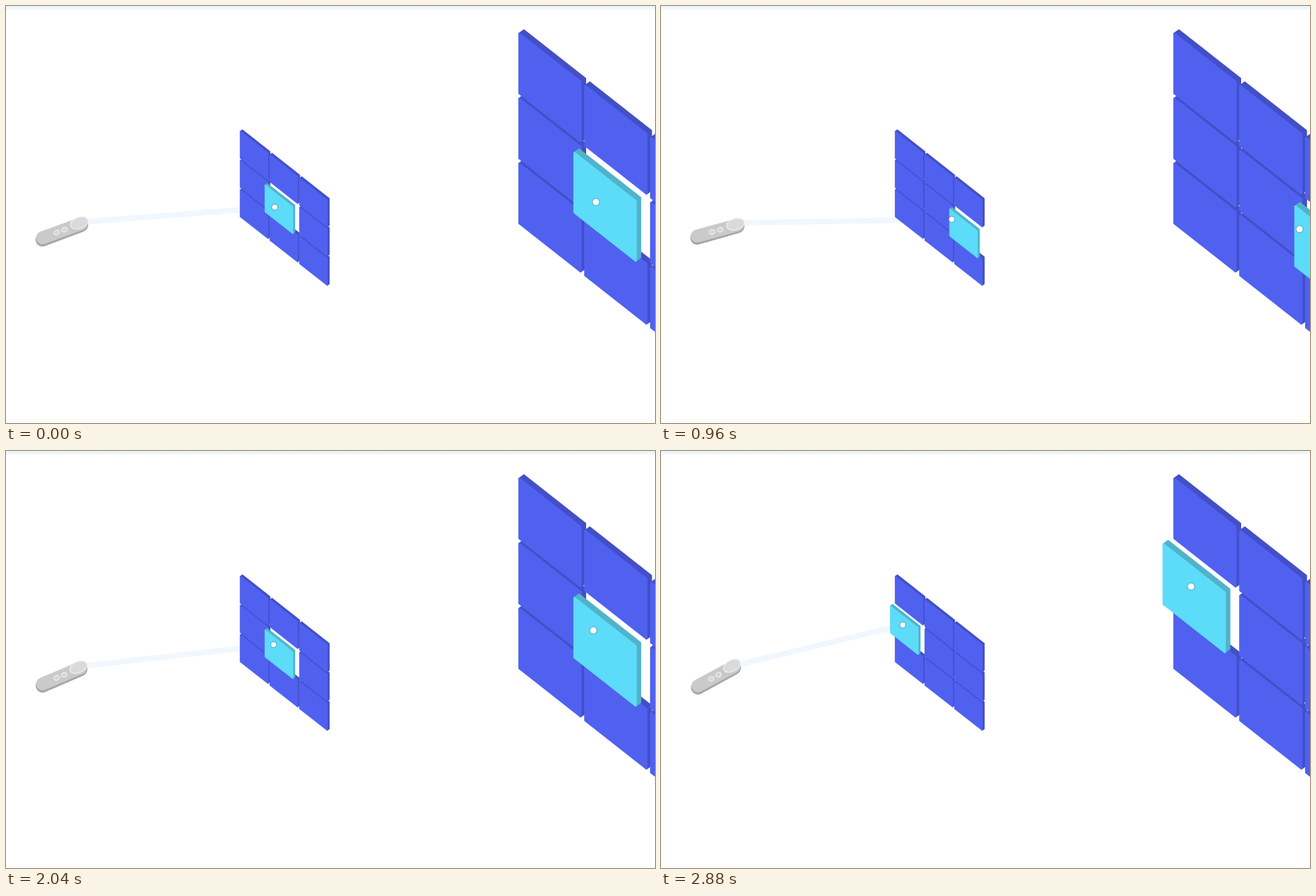
These frames come from a looping animation (933 px wide and 600 px high, 2940 ms). An HTML page with a canvas:

```html
<!DOCTYPE html>
<html lang="en">
<head>
<meta charset="utf-8">
<title>Pointing at tiles</title>
<style>
html, body { margin: 0; width: 100%; height: 100%; overflow: hidden; background: #fff; }
canvas { display: block; }
</style>
</head>
<body>
<canvas id="stage" width="933" height="600"></canvas>
<script>
const ctx = document.getElementById('stage').getContext('2d');
const LOOP = 2940, STEP = 60;
const LARGE = { x: 736.5, y: 38.4, scale: 1 };
const SMALL = { x: 336.2, y: 179.8, scale: 0.45 };
const SLOPE = 0.787;
const FACE = { w: 91, h: 88.6 };
const DEPTH = { x: 6.5, y: -4.8 };

// Pointer path on the large wall: time, x, y
const PATH = [
  [0, 848, 282], [660, 914, 335], [800, 924, 332], [960, 918, 321],
  [1200, 903, 316], [1680, 884, 295], [2340, 809, 227], [2880, 762, 195]
];
// Moments when another column of the middle row becomes active
const SWITCHES = [[-1000, 1], [730, 2], [1070, 1], [2235, 0]];
const RISE = 195, FALL = 165;
// Front and side colours: resting, rising, raised
const COLOURS = [['#5061f0', '#434fc6'], ['#5894f8', '#467ad4'], ['#5cdcf8', '#50b3ca']];

const mix = (a, b, k) => a + (b - a) * k;
const clamp = k => Math.max(0, Math.min(1, k));
const smooth = k => k * k * (3 - 2 * k);

function slopeAt(i, axis) {
  const a = PATH[Math.max(0, i - 1)], b = PATH[Math.min(PATH.length - 1, i + 1)];
  return (b[axis] - a[axis]) / (b[0] - a[0]);
}

function pointerAt(t) {
  let i = 0;
  while (i < PATH.length - 2 && t >= PATH[i + 1][0]) i++;
  const a = PATH[i], b = PATH[i + 1], span = b[0] - a[0];
  const k = clamp((t - a[0]) / span);
  const [x, y] = [1, 2].map(axis =>
    mix(a[axis], b[axis], smooth(k)) +
    span * k * (1 - k) * ((1 - k) * slopeAt(i, axis) - k * slopeAt(i + 1, axis)));
  return { x, y };
}

function raisedAt(t) {
  let raised = [0, 0, 0];
  for (const [start, active] of SWITCHES) {
    const ease = duration => smooth(clamp((t - start) / duration));
    raised = raised.map((v, col) => col === active ? mix(v, 1, ease(RISE)) : mix(v, 0, ease(FALL)));
  }
  return raised;
}

function polygon(points, colour) {
  ctx.beginPath();
  points.forEach(p => ctx.lineTo(...p));
  ctx.closePath();
  ctx.fillStyle = ctx.strokeStyle = colour;
  ctx.lineWidth = 3;
  ctx.lineJoin = 'round';
  ctx.fill();
  ctx.stroke();
}

function tile(col, row, lift) {
  const x = col * 94.7 - 15.5 * lift + 1.5;
  const y = col * 75 + row * 93.5 + (1 + 2 * col) * lift + 1.5;
  const w = FACE.w - 3, h = FACE.h - 3, drop = w * SLOPE;
  const back = ([px, py]) => [px + DEPTH.x, py + DEPTH.y];
  const tl = [x, y], tr = [x + w, y + drop];
  const br = [x + w, y + drop + h], bl = [x, y + h];
  const [front, side] = COLOURS[lift < 0.08 ? 0 : lift < 0.7 ? 1 : 2];
  polygon([tl, back(tl), back(tr), back(br), br, tr], side);
  polygon([tl, tr, br, bl], front);
}

function wall({ x, y, scale }, raised) {
  ctx.save();
  ctx.translate(x, y);
  ctx.scale(scale, scale);
  for (let col = 0; col < 3; col++)
    for (let row = 2; row >= 0; row--) tile(col, row, row === 1 ? raised[col] : 0);
  ctx.restore();
}

function dot(x, y, r) {
  ctx.beginPath();
  ctx.arc(x, y, r, 0, 7);
  ctx.fillStyle = '#fff';
  ctx.strokeStyle = 'rgba(95, 125, 150, 0.5)';
  ctx.lineWidth = 2.4;
  ctx.stroke();
  ctx.fill();
}

function line(x1, y1, x2, y2, width, colour) {
  ctx.beginPath();
  ctx.moveTo(x1, y1);
  ctx.lineTo(x2, y2);
  ctx.lineCap = 'round';
  ctx.lineWidth = width;
  ctx.strokeStyle = colour;
  ctx.stroke();
}

function ellipse(x, y, rx, ry, angle, fill, stroke) {
  ctx.beginPath();
  ctx.ellipse(x, y, rx, ry, angle, 0, 7);
  ctx.fillStyle = fill;
  ctx.fill();
  ctx.strokeStyle = stroke;
  ctx.lineWidth = 1.3;
  ctx.stroke();
}

function remote(tilt, target) {
  const ax = mix(53, 52, tilt), ay = mix(338, 331, tilt);
  const bx = mix(105, 110, tilt), by = mix(310, 315, tilt);
  const angle = Math.atan2(by - ay, bx - ax);
  line(bx + 8, by - 3, target.x, target.y, 8, '#f1f7fd');
  line(ax, ay + 2.5, bx, by + 2, 20, '#a6a6a6');
  line(ax, ay, bx, by, 18.5, '#cacaca');
  ellipse(bx - 3, by - 1, 13, 8, angle, '#dadada', '#eeeeee');
  for (const k of [0.37, 0.57])
    ellipse(mix(ax, bx, k), mix(ay, by, k), 4, 3.2, angle, '#d4d4d4', '#f0f0f0');
}

function draw(t) {
  const p = pointerAt(t), raised = raisedAt(t);
  const near = {
    x: SMALL.x + (p.x - LARGE.x) * SMALL.scale,
    y: SMALL.y + (p.y - LARGE.y) * SMALL.scale
  };
  ctx.fillStyle = '#fff';
  ctx.fillRect(0, 0, 933, 600);
  const bar = ctx.createLinearGradient(0, 0, 0, 6);
  bar.addColorStop(0, '#eaf3fb');
  bar.addColorStop(0.6, '#eff6fc');
  bar.addColorStop(1, '#fff');
  ctx.fillStyle = bar;
  ctx.fillRect(0, 0, 933, 6);
  remote(clamp((p.y - 215) / 105), near);
  wall(SMALL, raised);
  wall(LARGE, raised);
  dot(near.x, near.y, 3.7);
  dot(p.x, p.y, 4.6);
}

function tick() {
  const t = performance.now() % LOOP;
  draw(Math.floor(t / STEP) * STEP);
  requestAnimationFrame(tick);
}
tick();
</script>
</body>
</html>
```
